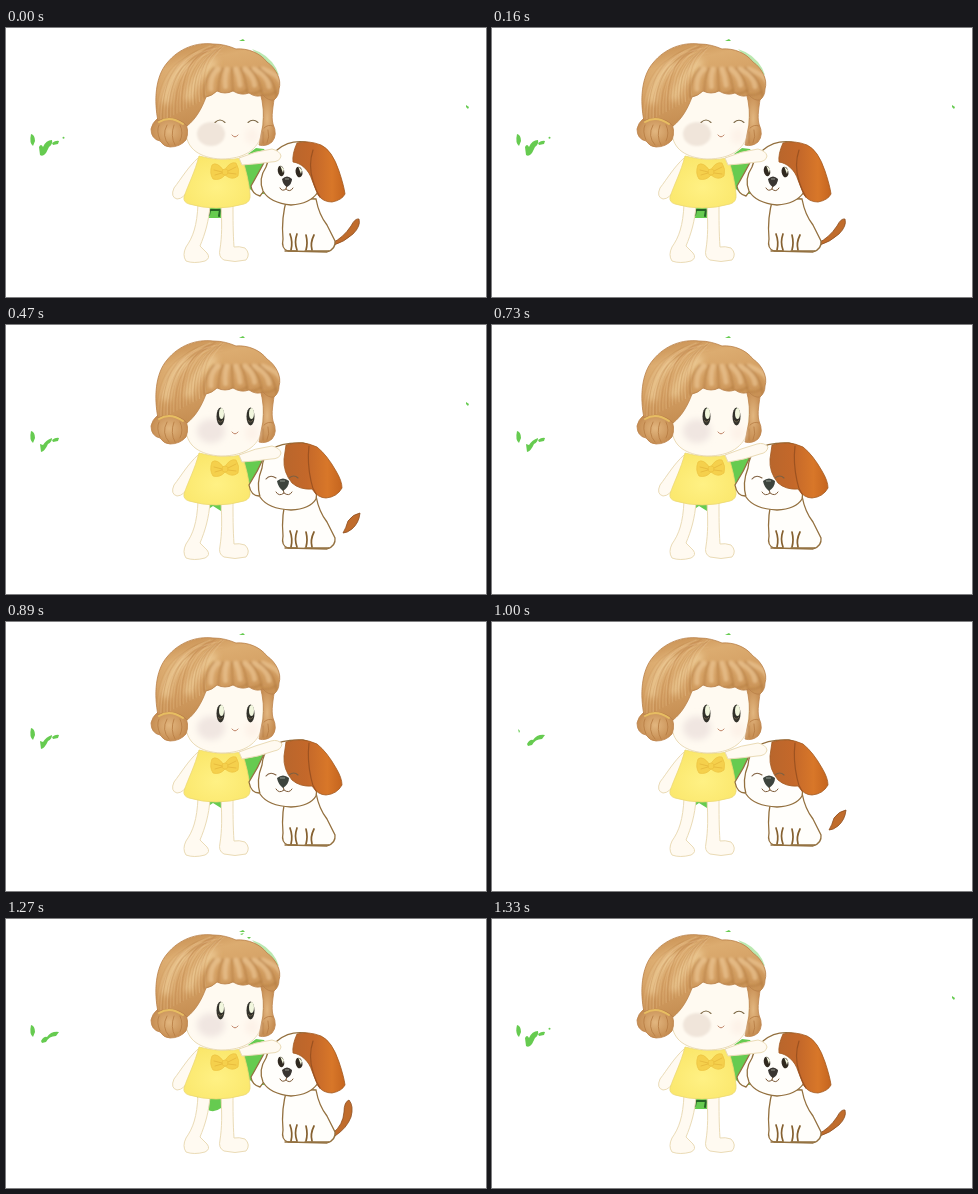
An HTML page for the animation above (1.47 s loop, 480x269 px).

```html
<!DOCTYPE html>
<html lang="en">
<head>
<meta charset="utf-8">
<title>Girl and puppy</title>
<style>
html, body { margin: 0; width: 100%; height: 100%; overflow: hidden; background: #fff; }
svg { display: block; width: 100vw; height: 100vh; }
[data-part] { visibility: hidden; }
.skin { fill: #fffaf1; stroke: #eadbb6; stroke-width: 1; }
.fur { fill: #fffefb; stroke: #93703f; stroke-width: 1.3; }
.line { fill: none; stroke-linecap: round; stroke-linejoin: round; }
.green { fill: #66cb50; }
.ear { fill: url(#earFill); stroke: #a35a20; stroke-width: .8; }
.tail { fill: #c06c2c; stroke: #8d4f20; stroke-width: .8; }
</style>
</head>
<body>
<svg viewBox="0 0 480 269" preserveAspectRatio="none">
<defs>
  <linearGradient id="hairFill" x1="0" y1="0" x2=".35" y2="1">
    <stop offset="0" stop-color="#c48a4c"/><stop offset=".3" stop-color="#dcac70"/>
    <stop offset=".6" stop-color="#d4a064"/><stop offset="1" stop-color="#c48c50"/>
  </linearGradient>
  <radialGradient id="bunFill">
    <stop offset="0" stop-color="#e2b67f"/><stop offset="1" stop-color="#c68d52"/>
  </radialGradient>
  <radialGradient id="dressFill" cx=".5" cy=".6" r=".65">
    <stop offset="0" stop-color="#fff184"/><stop offset="1" stop-color="#fae669"/>
  </radialGradient>
  <linearGradient id="earFill">
    <stop offset="0" stop-color="#b9662c"/><stop offset=".4" stop-color="#c4682a"/>
    <stop offset=".75" stop-color="#d87729"/><stop offset="1" stop-color="#c5651f"/>
  </linearGradient>
  <filter id="soft" x="-30%" y="-30%" width="160%" height="160%"><feGaussianBlur stdDeviation="1.2"/></filter>
  <filter id="haze" x="-30%" y="-30%" width="160%" height="160%"><feGaussianBlur stdDeviation="3"/></filter>
  <path id="hairShape" d="M152 93 C148 73 149 49 161 35 C173 20 191 14 207 16 C216 16 223 18 230 21 C242 20 254 25 261 34 C270 40 276 52 273 61 Q273 68 268 72 Q262 73 257 67 Q250 70 243 65 Q235 68 227 63 Q219 67 211 63 Q206 68 200 69 C196 80 190 91 181 98 C174 89 159 89 152 93Z"/>
  <clipPath id="hairClip"><use href="#hairShape"/></clipPath>
</defs>

<!-- floating leaves -->
<g class="green">
  <path data-part="leafA" d="M25 106 Q29 107 29 113 L27 118 Q23 115 25 106Z"/>
  <path data-part="leafTiny" d="M26 107 L28 109 L27 111Z"/>
  <path data-part="leafB" d="M33 119 Q35 115 37 119 Q40 112 46 112 Q47 116 43 119 L40 125 Q37 129 34 127Z"/>
  <path data-part="leafC" fill="#72d766" d="M33 119 Q36 116 39 118 Q46 112 54 113 L52 116 Q45 115 41 122 Q38 128 35 128Z"/>
  <path data-part="leafD" d="M34 119 L37 120 Q40 115 46 113 Q46 117 42 119 Q39 126 35 127Z"/>
  <path data-part="leafE" d="M35 122 Q38 117 41 118 Q45 112 53 113 L50 117 Q43 117 40 123 L36 124Z"/>
  <path data-part="leafF" d="M46 115 Q50 112 53 113 L52 116 L47 117Z"/>
  <circle data-part="dot" cx="57.5" cy="109.8" r="1"/>
  <path data-part="right" d="M460 77 L463 79 L462 81 L460 79Z"/>
  <path d="M233 13 L237 11 L239 13 L235 13Z"/>
  <path data-part="sprigs" d="M234 15 L238 14 L236 16Z M241 18 L245 18 L243 20Z"/>
  <path data-part="rim" d="M246 21 Q262 26 270 40 L273 47 L266 43Z" opacity=".45"/>
</g>

<!-- green gaps behind the figures -->
<g class="green">
  <path d="M233 136 L261 129 L252 150 L244 162Z"/>
  <path data-part="gapWide" d="M242 126 L250 120 L258 121 L263 130 L256 153 L258 166 L250 166 L243 160Z"/>
  <path d="M201 177 H217 L215 186 L207 181 L201 185Z"/>
  <path data-part="gapTall" d="M190 177 H217 L215 189 Q207 195 201 190Z"/>
  <g data-part="gapDark">
    <path d="M201 178 H217 L215 190 H201Z"/>
    <path class="line" stroke="#256426" stroke-width="2" d="M203 187 L204 182 H214 L213 188"/>
  </g>
</g>

<!-- legs -->
<g class="skin">
  <path d="M192 176 C191 198 187 209 180 219 Q176 227 180 233 Q188 236 199 233 Q205 230 201 225 L194 218 C199 206 203 193 204 177Z"/>
  <path d="M215 176 C216 197 216 208 214 221 Q212 229 218 232 Q229 235 240 232 Q245 226 239 220 Q233 218 228 219 C227 204 227 192 227 175Z"/>
</g>
<path class="skin" d="M192 130 C182 139 175 151 168 160 Q164 169 171 171 Q178 171 183 160 L195 145Z"/>

<!-- dress -->
<path d="M193 128 C189 144 182 157 178 169 Q177 174 183 176 Q210 184 238 176 Q245 174 244 166 C243 154 240 142 236 130 Q215 134 193 128Z" fill="url(#dressFill)" stroke="#ecd873" stroke-width=".8"/>
<g fill="#f5d04c" stroke="#ecc23f" stroke-width=".7">
  <path d="M218 143 Q211 133 206 137 Q203 145 207 151 Q214 153 219 147 Q226 153 232 148 Q234 141 230 135 Q224 133 218 143Z"/>
  <circle cx="219" cy="144" r="3"/>
</g>
<path class="line" stroke="#e3b338" stroke-width=".7" d="M208 142 L216 144 M209 147 L216 145 M222 143 L230 139 M222 145 L230 146"/>

<!-- head -->
<path class="skin" d="M197 62 C188 80 180 91 180 105 C181 121 194 130 215 131 C238 131 252 122 256 105 Q258 83 257 62Z"/>
<path d="M254 64 H269 C267 80 265 88 267 96 Q272 107 266 114 Q260 119 253 117 Q255 105 257 97 Q259 82 254 64Z" fill="url(#bunFill)" stroke="#bd834c" stroke-width=".8"/>
<path class="line" stroke="#b77c43" stroke-width=".8" d="M258 100 Q262 96 267 98 M262 102 Q264 109 261 115 M257 104 L257 115"/>
<g>
  <path d="M152 90 Q165 84 178 92 Q184 102 180 112 Q174 119 164 119 Q158 119 154 113 Q145 111 145 101 Q146 95 152 90Z" fill="url(#bunFill)" stroke="#bd834c" stroke-width=".8"/>
  <path class="line" stroke="#b77b42" stroke-width=".8" d="M153 97 Q150 103 154 112 M161 97 Q155 108 163 117 M168 97 Q164 108 169 117 M174 97 Q178 105 174 113"/>
</g>
<use href="#hairShape" fill="url(#hairFill)"/>
<g clip-path="url(#hairClip)">
  <g class="line" stroke="#ebc892" stroke-width="8" filter="url(#haze)"><path d="M160 72 Q162 50 180 37 M183 69 Q189 47 207 35"/></g>
  <g id="strands" class="line" stroke-width="1.2"></g>
  <g id="curls" class="line" filter="url(#soft)"></g>
</g>
<use href="#hairShape" fill="none" stroke="#b98149" stroke-width=".8"/>
<path class="line" stroke="#e7bd62" stroke-width="2" d="M153 94 Q164 87 177 96"/>
<ellipse data-part="cheekWarm" cx="205" cy="106" rx="14" ry="12" fill="#f0e5da" filter="url(#soft)"/>
<ellipse data-part="cheekCool" cx="205" cy="106" rx="14" ry="12" fill="#f0e6e1" filter="url(#haze)"/>
<ellipse cx="246" cy="108" rx="7" ry="8" fill="#fdf2e8" filter="url(#haze)"/>
<path class="line" stroke="#bf8468" stroke-width="1" d="M226 107 Q229 111 232 107"/>
<g data-part="eyesShut" class="line" stroke="#7d6947" stroke-width="1.1"><path d="M209 94.5 Q214 89.5 219 94.5 M242 94.5 Q247 90 252 94.5"/></g>
<g data-part="eyesOpen">
  <g id="eye"><ellipse cx="214.5" cy="91.5" rx="4" ry="9" fill="#32312a"/><ellipse cx="215.5" cy="88.5" rx="2.5" ry="5.6" fill="#f1f6dd"/><path d="M212 95 Q214 99 217 95" fill="none" stroke="#685c47" stroke-width="1"/></g>
  <use href="#eye" x="30"/>
</g>

<!-- dog tails and body -->
<path data-part="tailOut" class="tail" d="M326 215 Q337 210 345 198 Q349 190 353 191 Q355 198 347 206 Q338 214 328 217Z"/>
<path data-part="tailUp" class="tail" d="M327 214 Q337 206 338 193 Q338 183 343 181 Q348 187 345 198 Q341 209 329 217Z"/>
<path data-part="tailTip" class="tail" d="M337 208 Q340 203 342 196 Q347 189 354 188 Q353 198 346 204 Q341 208 337 208Z"/>
<path class="fur" d="M281 170 Q275 190 277 211 Q275 221 282 223 L321 224 Q330 221 329 213 Q325 205 321 197 Q313 187 310 171Z"/>
<g class="line" stroke="#85602f" stroke-width="1.7"><path d="M284 206 Q287 214 285 222 M291 206 Q288 214 291 222 M300 207 Q302 215 300 222 M308 207 Q304 215 306 222"/></g>
<path class="line" stroke="#93703f" stroke-width="1.3" d="M279 223 H291 M299 223 H323"/>

<g data-part="dogAwake">
  <path class="fur" d="M261 129 Q252 146 245 158 Q246 166 254 168 Q261 160 263 148Z"/>
  <path class="fur" d="M271 122 Q283 112 299 114 Q312 116 317 132 L312 164 Q304 176 285 177 Q264 175 257 163 Q252 151 260 139 Q263 128 271 122Z"/>
  <path class="ear" d="M291 115 Q302 112 315 117 Q326 122 333 143 Q338 158 339 166 Q336 172 326 174 Q317 174 312 167 L306 152 C303 142 295 135 287 134 Q286 126 291 115Z"/>
  <path class="line" stroke="#9c5220" stroke-width="1.2" d="M307 122 Q302 137 307 153 Q310 163 314 169"/>
  <ellipse cx="275" cy="143" rx="3.2" ry="5.3" fill="#30291f" transform="rotate(-10 275 143)"/>
  <path d="M274 137 L278 141 L277 145Z" fill="#f4f8df"/>
  <ellipse cx="293" cy="144" rx="3.4" ry="5.4" fill="#30291f" transform="rotate(-10 293 144)"/>
  <path d="M292 138 L296 142 L295 146Z" fill="#f4f8df"/>
  <path class="line" stroke="#7c5937" stroke-width="1" d="M281 157 L280 161 Q276 164 274 160 M280 161 Q284 165 287 160"/>
  <path d="M276 151 Q281 146 286 151 Q286 156 281 159 Q277 157 276 151Z" fill="#393531"/>
  <path d="M279 151 H283" stroke="#93958b"/>
</g>
<g data-part="dogHappy">
  <path class="fur" d="M258 132 Q252 146 243 160 Q245 171 253 171 Q259 164 259 149Z"/>
  <path class="fur" d="M264 125 Q276 117 297 118 Q312 121 315 136 L310 174 Q304 184 285 185 Q262 184 254 172 Q250 158 256 143 Q257 131 264 125Z"/>
  <path class="ear" d="M280 120 Q296 115 311 122 Q321 130 330 146 Q336 156 336 163 Q331 172 320 173 Q312 173 306 164 Q294 165 286 158 Q277 147 278 134Z"/>
  <path class="line" stroke="#9d5220" stroke-width="1.2" d="M303 121 Q301 138 305 156 Q306 163 310 169"/>
  <path class="line" stroke="#806040" stroke-width="1.1" d="M260 154 Q264 149 270 153 M283 153 Q288 149 292 153"/>
  <path class="line" stroke="#7c5937" stroke-width="1" d="M277 164 L278 168 Q273 172 270 167 M278 168 Q283 172 286 167"/>
  <path d="M271 156 Q277 151 283 156 Q283 162 277 166 Q272 162 271 156Z" fill="#3d443d"/>
  <path d="M274 156 H279" stroke="#929b92"/>
</g>

<!-- petting arm -->
<path data-part="armFlat" class="skin" d="M233 130 Q249 123 266 121 Q274 123 275 128 Q274 134 265 134 Q251 136 236 137Z"/>
<path data-part="armCurl" class="skin" d="M233 130 Q251 123 265 119 Q272 117 276 122 Q275 128 268 129 Q252 135 236 137Z"/>
</svg>
<script>
const LOOP = 1470;
const awake = "dogAwake armFlat gapWide";
const shut = "eyesShut cheekWarm gapDark leafA leafB leafF dot right rim tailOut " + awake;
const open = "eyesOpen cheekCool ";
const happy = open + "dogHappy ";
const steps = [
  [0, shut],
  [270, happy + "armCurl tailUp leafA leafC dot"],
  [470, happy + "armFlat tailTip leafA leafD leafF right"],
  [730, happy + "armCurl leafA leafD leafF"],
  [1000, happy + "armFlat tailTip leafTiny leafE"],
  [1270, open + awake + " gapTall tailUp leafA leafE sprigs rim"],
  [1330, shut]
].map(([at, parts]) => ({ at, parts: new Set(parts.split(" ")) }));

const stroke = (color, width, opacity, d) =>
  `<path stroke="${color}" stroke-width="${width}" opacity="${opacity}" d="${d}"/>`;

// soft strands sweep from the crown down the left side
let seed = 7;
const rand = () => (seed = seed * 16807 % 2147483647) / 2147483647;
const tones = ["#b98248", "#e6bd87", "#c8925a", "#edca9a"];
let strands = "";
for (let i = 0; i < 32; i++) {
  const u = i / 31;
  strands += stroke(tones[i % 4], 1.2, .15 + rand() * .2,
    `M${200 + 18 * u} ${17 + rand() * 8} Q${150 + 45 * u} ${24 + rand() * 16} ${150 + 50 * u} ${96 - 26 * u}`);
}
document.getElementById("strands").innerHTML = strands;

// rounded locks of the fringe
let curls = "";
for (let i = 0; i < 6; i++) {
  const x = 198 + 14.5 * i, y = 69 - 4 * Math.sin(i / 5 * Math.PI);
  const top = 208 + 9 * i;
  curls += stroke("#ecc896", 5, .6, `M${top + 4} 41 Q${x + 6} 48 ${x + 7} ${y - 8}`);
  curls += stroke("#ae7539", 1.6, .65, `M${top} 40 Q${x - 1} 52 ${x} ${y} Q${x + 7} ${y + 2} ${x + 14} ${y - 3}`);
}
document.getElementById("curls").innerHTML = curls;

const parts = [...document.querySelectorAll("[data-part]")];
let current;
function draw() {
  const time = performance.now() % LOOP;
  const step = steps.findLast(s => s.at <= time);
  if (step !== current) {
    for (const part of parts)
      part.style.visibility = step.parts.has(part.dataset.part) ? "visible" : "hidden";
    current = step;
  }
  requestAnimationFrame(draw);
}
draw();
</script>
</body>
</html>
```
